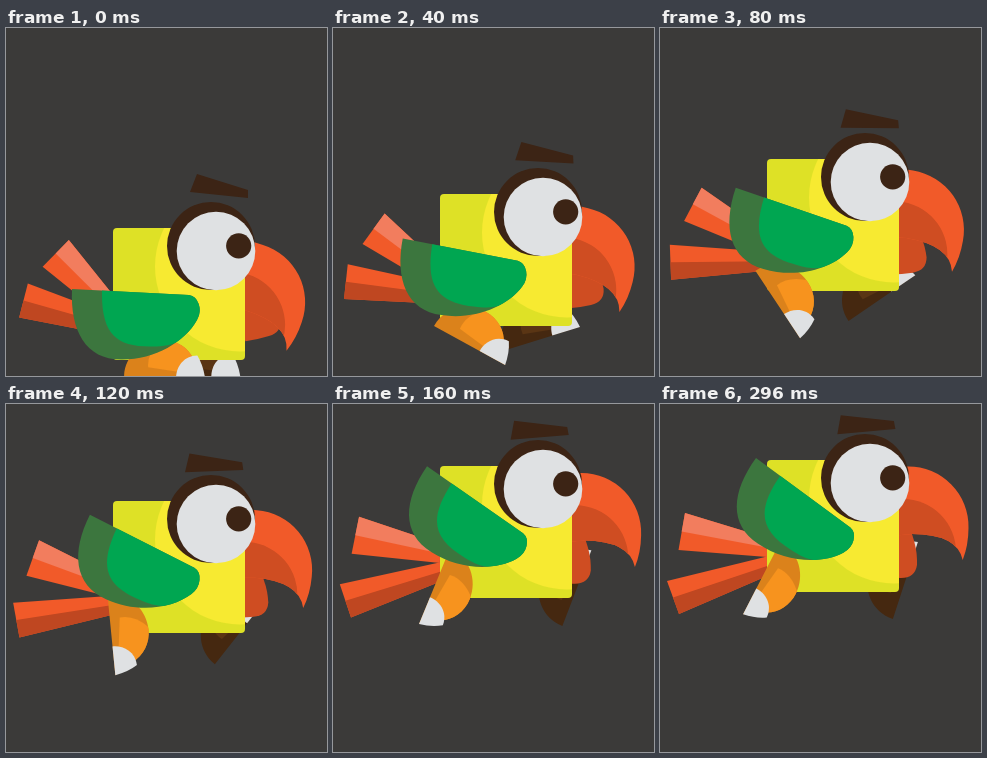
Recreate the animation shown at these times as an HTML page. Size 321 px wide and 348 px high, loop 360 ms.

```html
<!DOCTYPE html>
<html lang="en">
<head>
<meta charset="utf-8">
<title>Flapping parrot</title>
<style>
  /* --p: 0 = crouched low, 1 = raised with wing up */
  @property --p { syntax: '<number>'; inherits: true; initial-value: 0; }

  html, body { margin: 0; width: 100%; height: 100%; overflow: hidden; background: #3b3a39; }
  svg { display: block; width: 100%; height: 100%; animation: rise 360ms infinite; }

  /* linear lift, sampled 25 times a second, then a hold */
  @keyframes rise {
    0%      { --p: 0; animation-timing-function: steps(4, end); }
    44.444% { --p: .958; animation-timing-function: step-end; }
    55.556% { --p: 1; }
    100%    { --p: 1; }
  }

  .bird { transform: translateY(calc(var(--p) * -144px)); }
  @supports (width: round(1.5px, 1px)) {
    .bird { transform: translateY(round(var(--p) * -144px, 1px)); }
  }
  .turn { transform: rotate(calc(var(--from, 0deg) + var(--p) * var(--by))); }

  .brow     { --by: -11.2deg; transform-origin: 233px 203px; }
  .wing     { --by: 33.4deg; transform-origin: 186px 279.5px; }
  .beak     { --from: 17.8deg; --by: -17.8deg; transform-origin: 219px 240.5px; }
  .jaw      { --from: -17.2deg; --by: 17.2deg; transform-origin: 219px 240.5px; }
  .tail-top { --from: 34.3deg; --by: -34.3deg; transform-origin: 110.4px 293.8px; }
  .tail-low { --from: 34.3deg; --by: -34.3deg; transform-origin: 120.5px 312.3px; }

  .leg {
    transform: translate(calc(var(--x) + var(--p) * var(--dx)), calc(var(--y) + var(--p) * var(--dy)))
               rotate(calc(var(--from) + var(--p) * var(--by)));
  }
  .near { --x: 154.5px; --y: 313px; --dx: -18.4px; --dy: 18px; --from: .7deg; --by: 116.5deg;
          --dark: #db821b; --light: #f7931e; }
  .far  { --x: 191.4px; --y: 320.8px; --dx: 26.9px; --dy: -6.6px; --from: 0deg; --by: -72deg;
          --dark: #452810; --light: #5a3514; }

  .shade { fill: var(--dark); }
  .tint  { fill: var(--light); }
  .white { fill: #dfe1e3; }
  .brown { fill: #3c2415; }
  .red   { fill: #f15a29; }
  .rust  { fill: #cf4d22; }
</style>
</head>
<body>
<svg viewBox="0 0 321 348" preserveAspectRatio="none">
  <defs>
    <path id="thigh" d="M-40.500 0C-40.500 -22 -22 -37.500 -2 -37.500C12 -37.500 24 -30 29 -18L40.500 0Z"/>
    <path id="feathers" d="M66 261L183 267Q190 268 192.700 276Q195.500 284 191 292C179 314 148 332 115 331.500C80 331.500 64 303 66 261Z"/>
    <path id="hook" d="M230 206.500H248A60 60 0 0 1 308.500 268Q308.500 285 302.700 300Q297 274 252 274L230 276Z"/>
    <rect id="box" x="107" y="200" width="132" height="132" rx="4"/>
    <clipPath id="in-thigh"><use href="#thigh"/></clipPath>
    <clipPath id="in-wing"><use href="#feathers"/></clipPath>
    <clipPath id="in-hook"><use href="#hook"/></clipPath>
    <clipPath id="in-box"><use href="#box"/></clipPath>
    <g id="limb">
      <use href="#thigh" class="shade"/>
      <path class="tint" d="M-16.500 -10Q-18 -25 -3 -39L40 -45V-6H13Z" clip-path="url(#in-thigh)"/>
      <path class="white" d="M40.500 0H11.500C11.500 -10 18 -22 32.500 -22.500Q38.500 -13 40.500 0Z"/>
    </g>
  </defs>

  <g class="bird">
    <g class="leg far"><use href="#limb" x="2.400" y="27.700"/></g>

    <path class="turn jaw rust" d="M219 250L245 262L252 274Q257 289 257 300V305Q255 318 241 318Q228 318 217 316Z"/>
    <g class="turn beak">
      <use href="#hook" class="red"/>
      <circle class="rust" cx="243" cy="292" r="53" clip-path="url(#in-hook)"/>
    </g>

    <g class="turn tail-top">
      <path class="red" d="M25 253L107 278V297L18.500 290Z"/>
      <path fill="#f27d5e" d="M25 253L107 278V287.500L21.700 271.500Z"/>
    </g>
    <g class="turn tail-low">
      <path class="red" d="M7 321L107 296.500V316L19 354Z"/>
      <path fill="#bf4721" d="M13 337.500L107 306V316L19 354Z"/>
    </g>

    <use href="#box" fill="#dee126"/>
    <circle cx="234" cy="238.500" r="85" fill="#f7ea31" clip-path="url(#in-box)"/>

    <circle class="brown" cx="205" cy="218" r="44"/>
    <circle class="white" cx="210" cy="223" r="39.300"/>
    <circle class="brown" cx="232.700" cy="217.800" r="12.600"/>
    <path class="turn brow brown" d="M191 146L242 162V170L184 164Z"/>

    <g class="leg near"><use href="#limb" x="4.500" y="36.500"/></g>

    <g class="turn wing">
      <use href="#feathers" fill="#3c763e"/>
      <path fill="#00a651" clip-path="url(#in-wing)"
            d="M96 262C95 306 110 319 146 318.500C158 318.500 166 317 173 313L210 300V262Z"/>
    </g>
  </g>
</svg>
</body>
</html>
```
